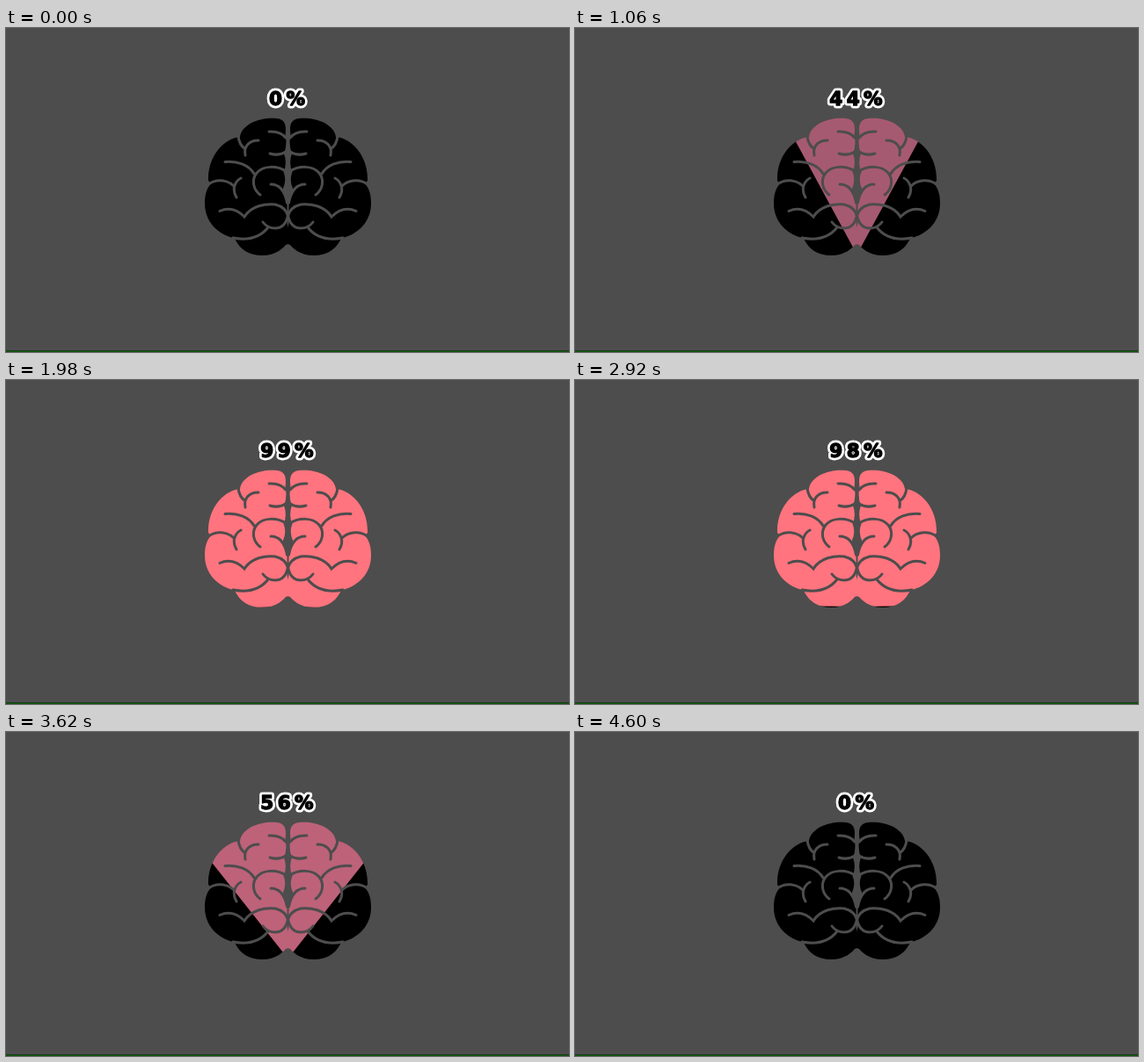
Write an HTML page that moves like this. It is 640 px wide and 369 px high and loops after 4640 ms.

```html
<!DOCTYPE html>
<html lang="en">
<head>
<meta charset="utf-8">
<title>Brain progress</title>
<style>
  html, body { margin: 0; width: 100%; height: 100%; overflow: hidden; background: #4d4d4d; }
  svg { display: block; }
  text {
    font: bold 21.5px "DejaVu Sans", sans-serif;
    letter-spacing: 4.4px;
    text-anchor: middle;
    stroke-linejoin: round;
  }
  .halo { fill: #fff; stroke: #fff; stroke-width: 6.8; }
  .ink { fill: #000; stroke: #000; stroke-width: 1.4; }
</style>
</head>
<body>
<svg width="640" height="369" viewBox="0 0 640 369">
  <defs>
    <g id="half">
      <path fill="#fff" d="M317.500 122 C318.500 114 319 104 308 103 C290 101 268 109 266 124
        C246 126 229 148 230 174 L233 177 C227 184 226 192 226 200 C226 220 240 235 260 239.500
        C266 253 277 259 291 259 C304 259 312 254 318 247 L321 246 V229
        L319.500 222 V202 C319 196 317 190 314.500 184 Q319.500 173 315.500 164
        Q320 154 316 143 Q320 133 317.500 122Z"/>
      <g fill="none" stroke="#000" stroke-width="3" stroke-linecap="round">
        <path d="M264 123 Q265 133 272 138 M272 145 C270 135 276 128 287 128"/>
        <path d="M299 118 Q312 117 318 125"/>
        <path d="M300 143 Q310 146 318 141"/>
        <path d="M249 152.500 C263 151 276 156 282 166"/>
        <path d="M318 163 C307 156 292 157 285 165 C278 174 282 185 289 190"/>
        <path d="M230 178 C239 171 252 173 259 180 M267 171 C261 174 256 183 262 193"/>
        <path d="M301 178 C311 178 317 186 319.500 199"/>
        <path d="M243 208.500 C255 203 264 208 271 215 C279 202 295 200 306 201 C314 203 319 208 320.500 214"/>
        <path d="M258 239 C279 243 291 236 298 227 M292 221 Q297 228 306 228 C315 228 319 221 320.500 213"/>
      </g>
    </g>
    <mask id="brain" maskUnits="userSpaceOnUse" x="0" y="0" width="640" height="369">
      <use href="#half"/>
      <use href="#half" transform="matrix(-1 0 0 1 641 0)"/>
    </mask>
  </defs>
  <rect width="640" height="369" fill="#4d4d4d"/>
  <rect y="367" width="640" height="1" fill="#1f381f"/>
  <rect y="368" width="640" height="1" fill="#0a5c0a"/>
  <g mask="url(#brain)">
    <rect width="640" height="369"/>
    <polygon id="fan"/>
  </g>
  <text class="halo" x="321.700" y="87.800"></text>
  <text class="ink" x="321.700" y="87.800"></text>
</svg>
<script>
  const LOOP = 4640, STEP = 20, RATE = 0.06;
  const RISE = 315, FALL = 2902;
  const APEX = { x: 320.5, y: 258 }, REACH = 400;
  const fan = document.getElementById('fan');
  const labels = document.querySelectorAll('text');
  const clamp = (v, lo, hi) => Math.min(hi, Math.max(lo, v));

  function percentAt(t) {
    if (t < STEP) return 0;
    if (t < FALL) return Math.floor(clamp((t - RISE) * RATE, 1, 100));
    return Math.floor(clamp(100 - (t - FALL) * RATE, 0, 100));
  }

  // Half the opening angle; it widens faster as the value grows.
  function spread(p) {
    const deg = 0.5 * p + 0.0033 * p * p + 11 * (p / 100) ** 12;
    return deg * Math.PI / 180;
  }

  function colour(p) {
    const r = Math.min(255, 81 + 1.93 * p);
    const g = Math.min(116, 63 + 0.62 * p);
    const b = Math.min(126, 84 + 0.66 * p);
    return `rgb(${r}, ${g}, ${b})`;
  }

  function draw(p) {
    const angle = spread(p);
    const rim = [-1, -0.5, 0, 0.5, 1].map(k =>
      `${APEX.x + REACH * Math.sin(k * angle)},${APEX.y - REACH * Math.cos(k * angle)}`);
    fan.setAttribute('points', `${APEX.x},${APEX.y} ${rim.join(' ')}`);
    fan.setAttribute('fill', colour(p));
    labels.forEach(label => { label.textContent = p + '%'; });
  }

  const start = performance.now();
  function tick() {
    const t = (performance.now() - start) % LOOP;
    draw(percentAt(Math.floor(t / STEP) * STEP));
    requestAnimationFrame(tick);
  }
  tick();
</script>
</body>
</html>
```
